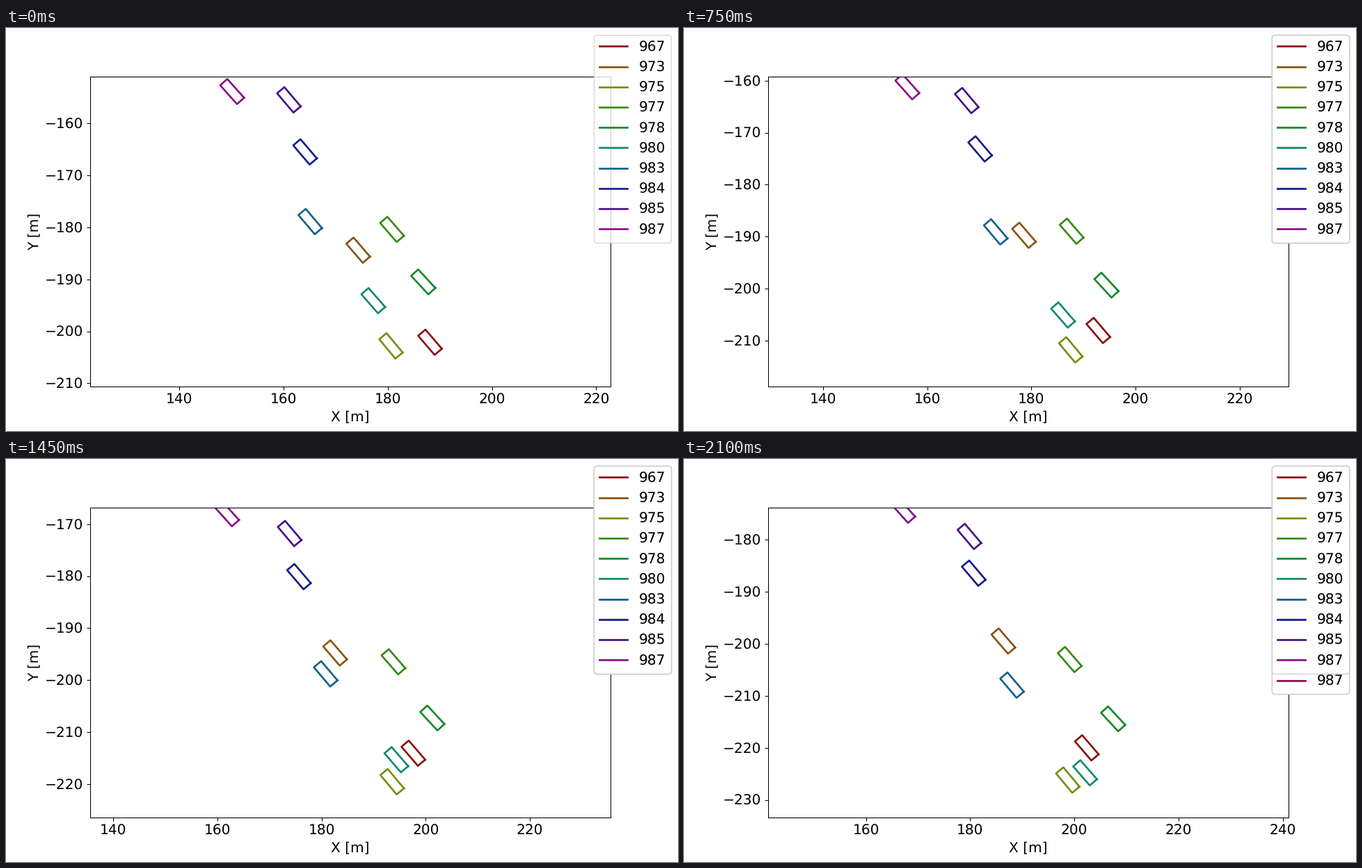
Recreate the animation shown at these times as a matplotlib script. Size 966x580 px, loop 2150 ms.

```python
import colorsys

import numpy as np
import matplotlib.pyplot as plt
from matplotlib.animation import FuncAnimation
from matplotlib.lines import Line2D
from matplotlib.ticker import MultipleLocator

FRAMES, INTERVAL = 43, 50
WIDTH, HEIGHT, DPI = 966, 580, 96
LENGTH, BREADTH = 4.85, 1.83      # vehicle size in metres
HALF_X = 50
HALF_Y = HALF_X * (0.77 * HEIGHT) / (0.775 * WIDTH)
DRIFT = 2                         # degrees between course and body
STACK = 6                         # translucent legends shown at once

# id: start x, start y, course in degrees, speed and speed-up per loop
VEHICLES = {
    967: (188.1, -202.1, 51.4, 20.4, 2.5),
    973: (174.3, -184.4, 51.3, 19.1, 0.2),
    975: (180.6, -202.8, 52.2, 33.0, -3.4),
    977: (180.8, -180.4, 51.0, 31.8, -2.7),
    978: (186.8, -190.5, 49.2, 33.2, -1.6),
    980: (177.2, -194.1, 51.0, 39.5, 0.0),
    983: (165.1, -178.9, 51.7, 36.0, 1.0),
    984: (164.1, -165.5, 51.6, 27.6, -0.9),
    985: (161.0, -155.5, 51.7, 29.4, 1.0),
    987: (150.1, -153.9, 50.2, 26.6, 0.0),
}
X0, Y0, COURSE, SPEED, GAIN = np.array(list(VEHICLES.values())).T

COLORS = [colorsys.hls_to_rgb(0.0925 * i, 0.3, 0.8) for i in range(11)]

plt.rcParams.update({
    "font.family": "DejaVu Sans",
    "font.size": 15.1,
    "text.hinting": "none",
    "lines.linewidth": 2,
    "legend.labelspacing": 0.49,
})

fig = plt.figure(figsize=(WIDTH / DPI, HEIGHT / DPI), dpi=DPI)
ax = fig.add_axes([0.125, 0.11, 0.775, 0.77])
ax.set_xlabel("X [m]")
ax.set_ylabel("Y [m]")
ax.xaxis.set_major_locator(MultipleLocator(20))
ax.yaxis.set_major_locator(MultipleLocator(10))

outlines = [ax.plot([], [], color=c)[0] for c, _ in zip(COLORS, VEHICLES)]


def make_legend(k):
    """Legend added at step k; for a short while it has an extra row."""
    labels = [str(v) for v in VEHICLES]
    if 37 <= k < 41:
        labels.append(labels[-1])
    handles = [Line2D([], [], color=c) for c, _ in zip(COLORS, labels)]
    return fig.legend(handles, labels, loc="upper right")


legends = [make_legend(k) for k in range(FRAMES)]


def positions(s):
    """Vehicle centres when the share s of the loop has passed."""
    angle = np.radians(COURSE)
    way = SPEED * s + GAIN * s ** 2
    return np.column_stack([X0 + way * np.cos(angle), Y0 - way * np.sin(angle)])


def corners(center, heading):
    angle = -np.radians(heading)
    cos, sin = np.cos(angle), np.sin(angle)
    box = np.array([(1, 1), (1, -1), (-1, -1), (-1, 1), (1, 1)])
    box = box * (LENGTH / 2, BREADTH / 2)
    return center + box @ np.array([(cos, sin), (-sin, cos)])


def update(k):
    centers = positions(k / (FRAMES - 1))
    for line, center, course in zip(outlines, centers, COURSE):
        line.set_data(*corners(center, course - DRIFT).T)

    # The view follows the middle of the group.
    x, y = centers.mean(axis=0)
    ax.set_xlim(x - HALF_X, x + HALF_X)
    ax.set_ylim(y - HALF_Y, y + HALF_Y)

    for start, legend in enumerate(legends):
        legend.set_visible(k - STACK < start <= k)
    return outlines


anim = FuncAnimation(fig, update, frames=FRAMES, interval=INTERVAL,
                     repeat=True, repeat_delay=0)
plt.show()
```
